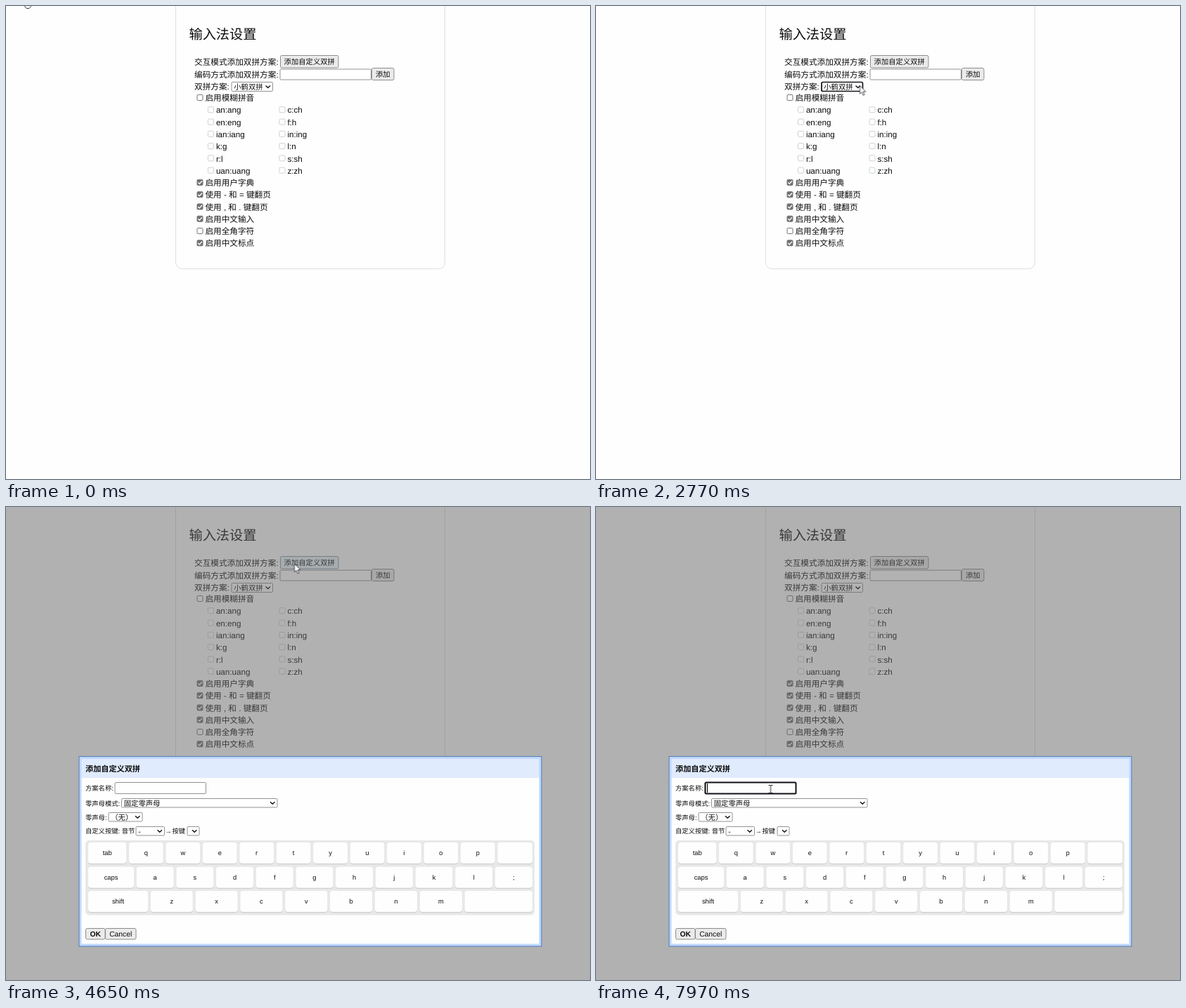
An HTML page for the animation above (8000 ms loop, 831 px wide and 674 px high).

```html
<!DOCTYPE html>
<html lang="zh-CN">
<head>
<meta charset="utf-8">
<title>输入法设置</title>
<style>
html, body { margin: 0; width: 100%; height: 100%; overflow: hidden; background: #fefefe; }
svg { display: block; width: 100%; height: 100%; }
text {
  font-family: "Liberation Sans", "Noto Sans CJK SC", "Noto Sans CJK", sans-serif;
  white-space: pre;
  text-rendering: geometricPrecision;
  fill: #0c0c0c;
}
.mid { text-anchor: middle; }
.step { animation: 8s step-end infinite; }

#hand { animation-name: hand; }
#arrow { animation-name: arrow; }
#beam { animation-name: beam; }
#ring { animation-name: ring; }
#hover { animation-name: hover; }
#dialog { animation-name: dialog; }
#focus { animation-name: focus; }
#caret { animation-name: caret; }

@keyframes hand {
  0% { transform: none; }
  5.5% { transform: translate(5px, 0); }
  8.25%, 100% { visibility: hidden; }
}
@keyframes arrow {
  0% { visibility: hidden; }
  8.25% { visibility: visible; transform: translate(112px, 24px); }
  11% { transform: translate(167px, 53px); }
  13.75% { transform: translate(285px, 95px); }
  16.5% { transform: translate(330px, 108px); }
  19.375% { transform: translate(360px, 112px); }
  22.25% { transform: translate(375.5px, 113.5px); }
  37.75% { transform: translate(375.5px, 112px); }
  40.5% { transform: translate(392px, 84px); }
  43.625% { transform: translate(409.5px, 82px); }
  46.375%, 58.125% { transform: translate(410.5px, 81px); }
  64% { transform: translate(392px, 141px); }
  67.125% { visibility: visible; transform: translate(304px, 349px); }
  69.875%, 100% { visibility: hidden; }
}
@keyframes beam {
  0% { visibility: hidden; }
  69.875% { visibility: visible; transform: translate(250px, 402px); }
  76.5%, 100% { visibility: visible; transform: translate(248.5px, 402px); }
}
@keyframes ring {
  0% { visibility: hidden; }
  25.75% { visibility: visible; }
  46.375%, 100% { visibility: hidden; }
}
@keyframes hover {
  0% { fill: #ebebeb; stroke: #8c8c8c; }
  40.5% { fill: #e5e5e5; stroke: #777; }
  55% { fill: #e9f3f8; stroke: #8297a4; }
  64%, 100% { fill: #ebebeb; stroke: #8c8c8c; }
}
@keyframes dialog {
  0% { visibility: hidden; }
  58.125%, 100% { visibility: visible; }
}
@keyframes focus {
  0% { visibility: hidden; }
  73.25%, 100% { visibility: visible; }
}
@keyframes caret {
  0% { visibility: hidden; }
  73.25% { visibility: visible; }
  82.375% { visibility: hidden; }
  88.25% { visibility: visible; }
  94.125% { visibility: hidden; }
  99.625%, 100% { visibility: visible; }
}
</style>
</head>
<body>
<svg id="stage" viewBox="0 0 831 674"></svg>
<script>
const BODY = 11.65, CONTROL = 10.35, LABEL = 9.3;

const rect = (x, y, w, h, fill, stroke = 'none', r = 0, extra = '') =>
  `<rect x="${x}" y="${y}" width="${w}" height="${h}" rx="${r}" fill="${fill}" stroke="${stroke}" ${extra}/>`;
const text = (x, y, size, str, extra = '') =>
  `<text x="${x}" y="${y}" font-size="${size}" ${extra}>${str}</text>`;
const box = (x, y, w, h) => rect(x + .5, y + .5, w - 1, h - 1, '#fff', '#929292', 1.2);
const button = (x, y, w, h, label, extra = '', textExtra = '') =>
  rect(x + .5, y + .5, w - 1, h - 1, '#ebebeb', '#8c8c8c', 2, extra) +
  text(x + w / 2, y + h / 2 + 3.9, CONTROL, label, `class="mid" ${textExtra}`);
const select = (x, y, w, h, label) => box(x, y, w, h) +
  text(x + 3.7, y + h / 2 + 3.9, CONTROL, label) +
  `<path d="M${x + w - 10.5} ${y + h / 2 - 1.6}l3.2 3.2 3.2-3.2" fill="none" stroke="#111" stroke-width="1.4"/>`;

function checkbox(cx, row, label, state) {
  const cy = 130.5 + row * 17.27;
  const tick = state === 'on'
    ? `<path d="M${cx - 2.7} ${cy}l2 2.1 3.7-4.2" fill="none" stroke="#fff" stroke-width="1.4"/>` : '';
  const stroke = state === 'disabled' ? '#ccd2d2' : '#747474';
  return rect(cx - 4, cy - 4, 8, 8, state === 'on' ? '#707070' : '#fff', stroke, 1.2) + tick +
    text(cx + 7.4, cy + 4.7, BODY, label);
}

function settings() {
  const fuzzy = [['an:ang', 'c:ch'], ['en:eng', 'f:h'], ['ian:iang', 'in:ing'],
    ['k:g', 'l:n'], ['r:l', 's:sh'], ['uan:uang', 'z:zh']];
  const options = ['启用用户字典', '使用 - 和 = 键翻页', '使用 , 和 . 键翻页',
    '启用中文输入', '启用全角字符', '启用中文标点'];
  return rect(241.5, -20, 383, 394.5, '#fefefe', '#dfdfdb', 9) +
    text(260.5, 47.2, 19.2, '输入法设置') +
    text(268, 83.7, BODY, '交互模式添加双拼方案:') +
    button(390, 70, 83.5, 18.5, '添加自定义双拼', 'id="hover" class="step"') +
    text(268, 101.7, BODY, '编码方式添加双拼方案:') +
    box(389.5, 89.5, 130.5, 16) + button(520, 88, 32.5, 18, '添加') +
    text(268, 119, BODY, '双拼方案:') + select(320.5, 108, 59.5, 14, '小鹤双拼') +
    rect(321, 108.5, 58.5, 13, 'none', '#15151c', 2, 'id="ring" class="step" stroke-width="1.7"') +
    checkbox(276, 0, '启用模糊拼音') +
    fuzzy.map(([a, b], i) =>
      checkbox(291.5, i + 1, a, 'disabled') + checkbox(393, i + 1, b, 'disabled')).join('') +
    options.map((label, i) => checkbox(276, i + 7, label, i === 4 ? '' : 'on')).join('');
}

function key(x, y, w, label) {
  return rect(x, y + 1.2, w, 30, '#cfcfcf', 'none', 4) + rect(x, y, w, 30, '#fefefe', 'none', 4) +
    text(x + w / 2, y + 18, LABEL, label, 'class="mid"');
}
function keyRow(y, first, firstWidth, letters, width, last) {
  const gap = 3.6;
  let x = 117, out = key(x, y, firstWidth, first);
  x += firstWidth + gap;
  for (const c of letters) {
    out += key(x, y, width, c);
    x += width + gap;
  }
  return last ? out + key(x, y, 749 - x, '') : out;
}

function dialog() {
  return rect(0, 0, 831, 674, '#666', 'none', 0, 'opacity=".5"') +
    rect(104, 355.5, 658, 270.5, '#c1d9ff', '#4f7bb5') +
    rect(107.5, 359, 651, 27, '#e0ebfe') + rect(107.5, 386, 651, 236.5, '#fefefe') +
    text(113, 377.2, 11.15, '添加自定义双拼', 'font-weight="700"') +
    text(113, 404, LABEL, '方案名称:') + box(154.5, 392, 130.5, 17) +
    rect(155.5, 392.5, 129, 16, '#fff', '#111118', 1.5, 'id="focus" class="step" stroke-width="2"') +
    rect(158, 394, 1, 13, '#000', 'none', 0, 'id="caret" class="step"') +
    text(113, 425.5, LABEL, '零声母模式:') + select(164, 415, 222.5, 13.5, '固定零声母') +
    text(113, 445.5, LABEL, '零声母:') + select(145.5, 435, 49, 13.5, '\uff08无\uff09') +
    text(113, 465.3, LABEL, '自定义按键: 音节') + select(184.5, 455, 41.5, 13.5, '-') +
    text(226.5, 465.3, LABEL, '→') + text(236.5, 465.3, LABEL, '按键') +
    select(257.5, 455, 18, 13.5, '') +
    rect(113, 475, 639, 106.5, '#e8e8e8', 'none', 5) +
    keyRow(478, 'tab', 54.3, 'qwertyuiop', 48.85, true) +
    keyRow(512.7, 'caps', 65, 'asdfghjkl;', 53.1) +
    keyRow(547, 'shift', 85, 'zxcvbnm', 60.25, true) +
    button(113, 600, 28.5, 16.5, 'OK', '', 'font-weight="700"') +
    button(141, 600, 44.5, 16.5, 'Cancel');
}

const cursors =
  `<path id="hand" class="step" d="M26-2Q26.5 1.5 29 3.4H33Q35.5 2 36-2" fill="#fff" stroke="#333"/>
  <path id="arrow" class="step" d="M0 0V11.8L2.7 9.3 4.7 13.8 6.6 13 4.7 8.6H8.4Z" fill="#fff" stroke="#3c3c44" stroke-width=".9"/>
  <path id="beam" class="step" d="M-3-5.5H-1Q0-5.5 0-4.5Q0-5.5 1-5.5H3M0-4.5V4.5M-3 5.5H-1Q0 5.5 0 4.5Q0 5.5 1 5.5H3" fill="none" stroke="#222"/>`;

document.getElementById('stage').innerHTML =
  settings() + `<g id="dialog" class="step">${dialog()}</g>` + cursors;
</script>
</body>
</html>
```
